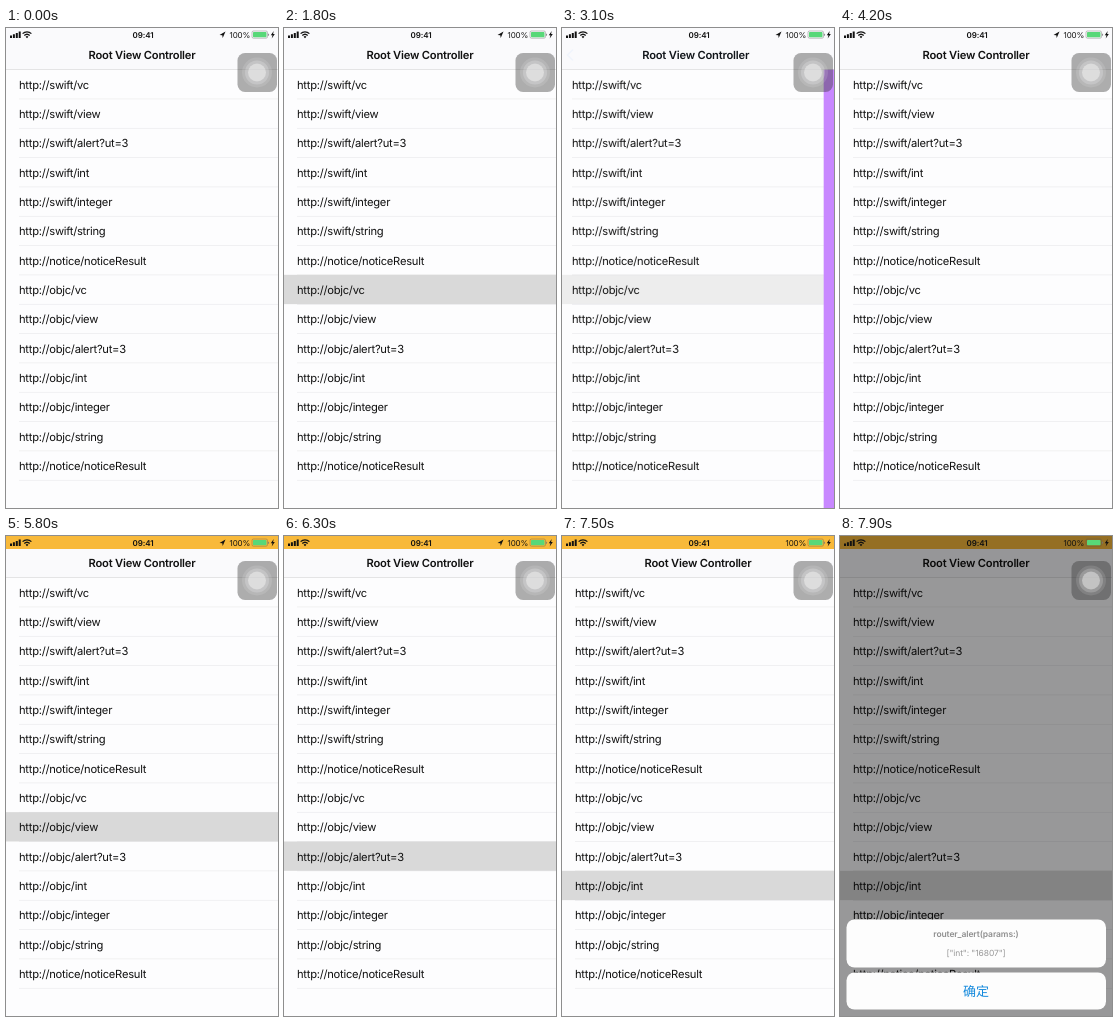
Recreate the animation shown at these times as an HTML page. Size 272x480 px, loop 8000 ms.

```html
<!DOCTYPE html>
<html lang="en">
<head>
<meta charset="utf-8">
<title>Route list</title>
<style>
  html, body { margin: 0; width: 100%; height: 100%; overflow: hidden; background: #fdfdfe; }
  svg { display: block; width: 100%; height: 100%; }
  text { font: 11.2px Inter, Roboto, sans-serif; letter-spacing: -.26px; fill: #111; text-rendering: geometricPrecision; }
  .mid { text-anchor: middle; }
  .title { font-weight: 600; letter-spacing: -.2px; }
  .status { font-size: 8px; letter-spacing: -.1px; }
  .clock { font-weight: 600; }
  .line { fill: #e8e8ea; }
  .pick { fill: #d9d9d9; opacity: 0; }
  .card { fill: #fdfdfd; }
  .head, .note { font-size: 8.5px; letter-spacing: -.1px; fill: #8f8f8f; }
  .head { font-weight: 600; }
  .note { fill: #989898; }
  .ok { font-size: 13px; font-weight: 500; fill: #ee6038; }
  .confirm { font: 500 13px "Noto Sans CJK SC", "Noto Sans CJK", sans-serif; letter-spacing: 0; fill: #1489dc; }

  .list, .page, .title, .chevron, .bar, .arrow, .pick, .dim, .sheet {
    animation: 8s linear infinite;
  }
  .list { animation-name: list; }
  .page { animation-name: page; }
  .title { animation-name: title; }
  .chevron { animation-name: chevron; }
  .bar { animation-name: bar; }
  .arrow { animation-name: arrow; }
  .dim { animation-name: dim; }
  .sheet.first { animation-name: first; }
  .sheet.second { animation-name: second; }
  .pick7 { animation-name: pick7; }
  .pick8 { animation-name: pick8; }
  .pick9 { animation-name: pick9; }
  .pick10 { animation-name: pick10; }

  /* push, then pop */
  @keyframes list {
    0%, 23.5% { transform: none; animation-timing-function: cubic-bezier(.2,.8,.2,1); }
    30.5%, 34.375% { transform: translateX(-81.6px); animation-timing-function: cubic-bezier(.2,.8,.2,1); }
    42.25%, 100% { transform: none; }
  }
  @keyframes page {
    0%, 23.5% { transform: translateX(272px); animation-timing-function: cubic-bezier(.2,.8,.2,1); }
    30.5%, 34.375% { transform: none; animation-timing-function: cubic-bezier(.2,.8,.2,1); }
    42.25%, 100% { transform: translateX(272px); }
  }
  @keyframes title {
    0%, 23.5% { transform: none; fill: #111; animation-timing-function: cubic-bezier(.2,.8,.2,1); }
    30.5%, 34.375% { transform: translateX(-60px); fill: #157efb; animation-timing-function: cubic-bezier(.2,.8,.2,1); }
    42.25%, 100% { transform: none; fill: #111; }
  }
  @keyframes chevron {
    0%, 23.5% { opacity: 0; }
    30.5%, 34.375% { opacity: 1; animation-timing-function: cubic-bezier(.2,.8,.2,1); }
    42.25%, 100% { opacity: 0; }
  }

  /* selected rows */
  @keyframes pick7 {
    0%, 21.87% { opacity: 0; }
    21.88%, 34.375% { opacity: 1; }
    42.25%, 100% { opacity: 0; }
  }
  @keyframes pick8 {
    0%, 71.87% { opacity: 0; }
    71.88%, 78.12% { opacity: 1; }
    78.13%, 100% { opacity: 0; }
  }
  @keyframes pick9 {
    0%, 78.12% { opacity: 0; }
    78.13%, 93.12% { opacity: 1; }
    93.13%, 100% { opacity: 0; }
  }
  @keyframes pick10 {
    0%, 93.12% { opacity: 0; }
    93.13%, 100% { opacity: 1; }
  }
  @keyframes bar {
    0%, 71.87% { opacity: 0; }
    71.88%, 100% { opacity: 1; }
  }
  @keyframes arrow {
    0%, 81.24% { opacity: 1; }
    81.25%, 100% { opacity: 0; }
  }

  /* action sheets */
  @keyframes dim {
    0%, 80% { opacity: 0; }
    83.75%, 89.4% { opacity: 1; }
    92.5%, 94.4% { opacity: 0; }
    98.1%, 100% { opacity: 1; }
  }
  @keyframes first {
    0%, 80% { transform: translateY(124px); animation-timing-function: cubic-bezier(.2,.8,.2,1); }
    83.75%, 89.4% { transform: none; animation-timing-function: ease-in-out; }
    92.5%, 100% { transform: translateY(124px); }
  }
  @keyframes second {
    0%, 94.4% { transform: translateY(124px); animation-timing-function: cubic-bezier(.2,.8,.2,1); }
    98.1%, 100% { transform: none; }
  }
</style>
</head>
<body>
<svg viewBox="0 0 272 480">
  <rect width="272" height="480" fill="#fdfdfe"/>
  <g class="list" id="list"></g>
  <rect class="page" y="41" width="272" height="439" fill="#c888ff"/>

  <rect width="272" height="41" fill="#fafafc"/>
  <rect y="41" width="272" height=".7" fill="#d8d8da"/>
  <rect class="bar" width="272" height="13" fill="#f8b93a"/>
  <path class="chevron" d="M11 21.5L5.500 27l5.500 5.500" fill="none" stroke="#157efb" stroke-width="1.700"/>
  <text class="mid title" x="136" y="31.300">Root View Controller</text>

  <rect class="dim" width="272" height="480" fill-opacity=".4"/>

  <g fill="#111">
    <path d="M4 7.500h2V10H4zM6.900 6.300h2V10h-2zM9.800 4.900h2V10h-2zM12.700 3.500h2V10h-2z"/>
    <g fill="none" stroke="#111" stroke-width="1.300">
      <path d="M16.600 5.600a6.300 6.300 0 0 1 8.800 0M18.300 7.500a3.900 3.900 0 0 1 5.400 0"/>
    </g>
    <path d="M19.600 8.700a2 2 0 0 1 2.800 0L21 10.200z"/>
    <path class="arrow" d="M213.500 7L219.500 3.500L216.700 10L216.300 7.200z"/>
    <path d="M267.700 3L264.800 7.200h1.700L265.700 10.500L268.800 6h-1.700z"/>
  </g>
  <text class="mid status clock" x="137" y="9.800">09:41</text>
  <text class="status" x="223.500" y="9.800">100%</text>
  <rect x="246" y="3" width="15.500" height="7.200" rx="1.500" fill="none" stroke="#555" stroke-opacity=".6" stroke-width=".6"/>
  <rect x="247" y="4" width="13.500" height="5.200" rx=".7" fill="#58d878"/>
  <path d="M262.200 5.500v2.500a1.300 1.300 0 0 0 0-2.500z" fill="#777"/>

  <g class="sheet first">
    <rect class="card" x="6.500" y="358" width="259.500" height="115.500" rx="8"/>
    <rect class="line" x="6.500" y="436" width="259.500" height=".6"/>
    <text class="mid head" x="136" y="376">router_alert</text>
    <text class="mid note" x="136" y="394">{</text>
    <text class="mid note" x="140" y="406">ut = 3;</text>
    <text class="mid note" x="136" y="418">}</text>
    <text class="mid ok" x="136" y="459.500">ok</text>
  </g>
  <g class="sheet second">
    <rect class="card" x="6.500" y="383.500" width="259.500" height="48" rx="8"/>
    <rect class="card" x="6.500" y="436.500" width="259.500" height="37" rx="8"/>
    <text class="mid head" x="136" y="401">router_alert(params:)</text>
    <text class="mid note" x="136" y="420">["int": "16807"]</text>
    <text class="mid confirm" x="136" y="460">确定</text>
  </g>

  <g>
    <rect x="231.500" y="25" width="39.500" height="39" rx="7.500" fill="#363636" fill-opacity=".4"/>
    <g fill="#fff">
      <circle cx="251" cy="44.500" r="15" fill-opacity=".12"/>
      <circle cx="251" cy="44.500" r="12" fill-opacity=".2"/>
      <circle cx="251" cy="44.500" r="9" fill-opacity=".4"/>
    </g>
  </g>
</svg>
<script>
  const scheme = "http";
  const kinds = ["vc", "view", "alert?ut=3", "int", "integer", "string"];
  const routes = ["swift", "objc"].flatMap(host =>
    [...kinds.map(kind => `${host}/${kind}`), "notice/noticeResult"]);
  const listTop = 42, pitch = 29.33;

  document.getElementById("list").innerHTML = routes.map((route, i) => {
    const y = listTop + i * pitch;
    const pick = i >= 7 && i <= 10
      ? `<rect class="pick pick${i}" y="${y - .5}" width="354" height="${pitch}"/>` : "";
    return `<rect class="line" x="13" y="${y + pitch - .7}" width="341" height=".6"/>${pick}
      <text x="13" y="${y + 18.7}">${scheme}://${route}</text>`;
  }).join("");
</script>
</body>
</html>
```
